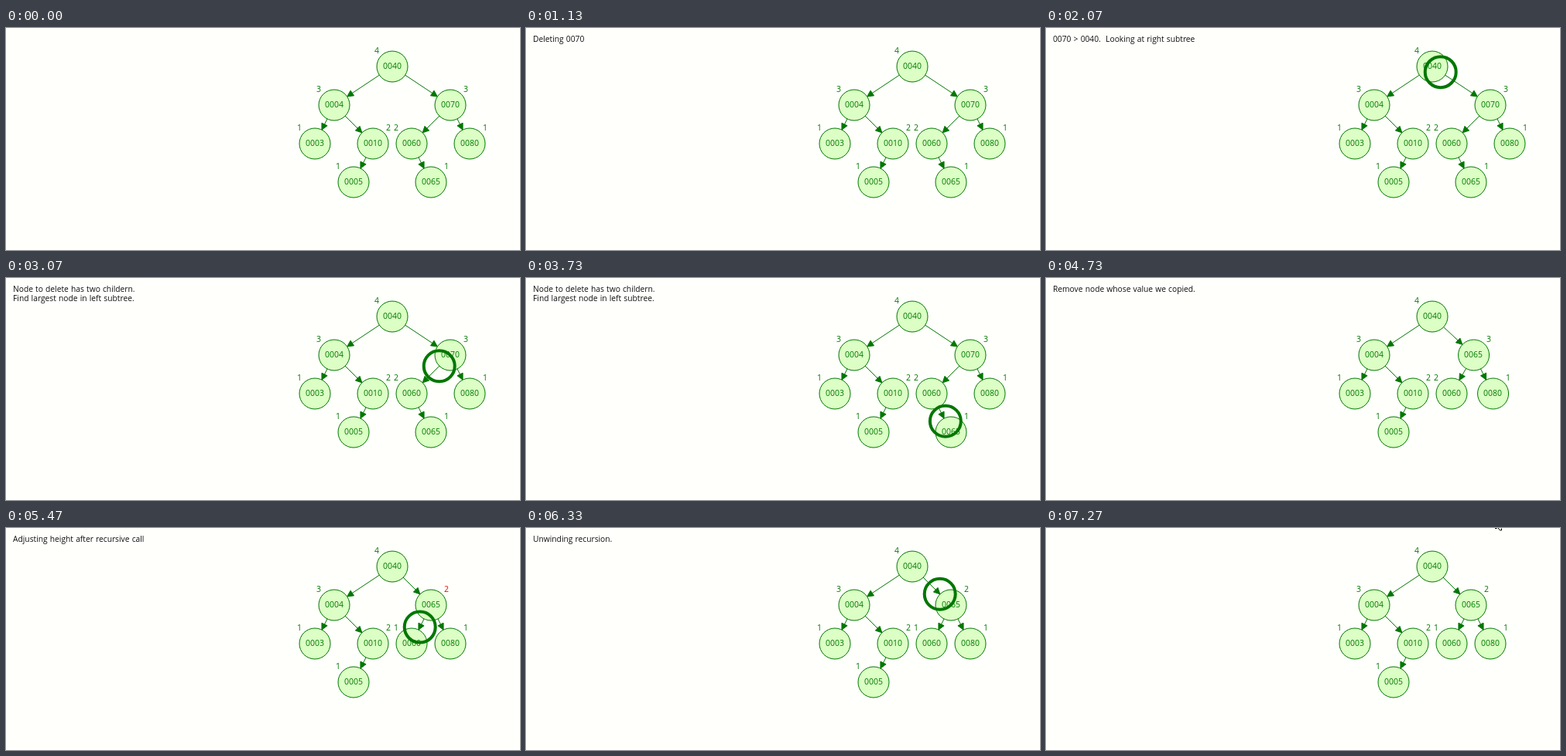
An HTML page with a canvas that plays this animation: 664 px wide and 288 px high, repeating every 7670 ms.

```html
<!DOCTYPE html>
<html lang="en">
<head>
<meta charset="utf-8">
<title>AVL tree deletion</title>
<style>
  html, body { margin: 0; width: 100%; height: 100%; overflow: hidden; background: #fffffc; }
  canvas { display: block; }
</style>
</head>
<body>
<canvas id="stage" width="664" height="288"></canvas>
<script>
const LOOP = 7670;
const BLOCK = 14; // ticks per step, 30 ticks per second
const GREEN = '#007700', RED = '#ff0000', FILL = '#dbffc4', PAPER = '#fffffc', INK = '#111';
const FAMILY = '"Open Sans", "Noto Sans", sans-serif';
const ctx = document.getElementById('stage').getContext('2d');

const captions = [
  [0, ''],
  [33, 'Deleting 0070'],
  [46, '0070 > 0040.  Looking at right subtree'],
  [74, '0070 == 0070.  Found node to delete'],
  [88, 'Node to delete has two childern.\nFind largest node in left subtree.'],
  [116, 'Copy largest value of left subtree into node to delete.'],
  [130, 'Remove node whose value we copied.'],
  [144, 'Adjusting height after recursive call'],
  [186, 'Unwinding recursion.'],
  [200, '']
];

// Highlight ring: start tick, from node, to node
const ringMoves = [
  [60, 'root', 'right'],
  [88, 'right', 'mid'],
  [102, 'mid', 'leaf'],
  [116, 'leaf', 'leaf'],
  [144, 'mid', 'mid'],
  [158, 'mid', 'right'],
  [186, 'right', 'root']
];

const pulses = [[46, 'root'], [74, 'right']];
const links = ['root left', 'root right', 'left n3', 'left n10', 'n10 n5',
               'right mid', 'right n80', 'mid leaf'];

const progress = (tick, start) => Math.min(1, Math.max(0, (tick - start) / BLOCK));
const active = (tick, start) => tick >= start && tick < start + BLOCK;
const mix = (a, b, p) => a + (b - a) * p;

// side is -1 or 1: where the height label sits
function node(x, y, text, height, side, labelColor = GREEN) {
  return { x, y, text, height, side, labelColor };
}

function buildTree(tick) {
  const shift = 25 * progress(tick, 130);
  const value = tick < 116 ? '0070' : tick < 130 ? '' : '0065';
  const tree = {
    root: node(499, 50, '0040', 4, -1),
    left: node(424, 100, '0004', 3, -1),
    n3: node(399, 150, '0003', 1, -1),
    n10: node(474, 150, '0010', 2, 1),
    n5: node(449, 200, '0005', 1, -1),
    right: node(574 - shift, 100, value, tick < 158 ? 3 : 2, 1,
                tick >= 158 && tick < 186 ? RED : GREEN),
    mid: node(524, 150, '0060', tick < 144 ? 2 : 1, -1, active(tick, 144) ? RED : GREEN),
    n80: node(599 - shift, 150, '0080', 1, 1)
  };
  if (tick < 130) tree.leaf = node(549, 200, '0065', 1, 1);
  return tree;
}

// Centred text, its left edge on a whole pixel
function write(text, x, y, color) {
  ctx.font = '10.45px ' + FAMILY;
  ctx.fillStyle = color;
  ctx.fillText(text, Math.floor(x - ctx.measureText(text).width / 2), Math.round(y));
}

function writeCaption(tick) {
  const caption = captions.filter(c => tick >= c[0]).pop()[1];
  ctx.save();
  ctx.font = '10.25px ' + FAMILY;
  ctx.wordSpacing = '0.5px';
  ctx.fillStyle = INK;
  caption.split('\n').forEach((line, i) => ctx.fillText(line, 9, 18 + 12 * i));
  ctx.restore();
}

function disc(x, y, r) {
  ctx.beginPath();
  ctx.arc(x, y, r, 0, Math.PI * 2);
}

function drawLink(a, b) {
  const d = Math.hypot(b.x - a.x, b.y - a.y);
  const ux = (b.x - a.x) / d, uy = (b.y - a.y) / d;
  const tipX = b.x - ux * 20, tipY = b.y - uy * 20;
  const baseX = tipX - ux * 8, baseY = tipY - uy * 8;
  ctx.strokeStyle = ctx.fillStyle = GREEN;
  ctx.lineWidth = 1;
  ctx.beginPath();
  ctx.moveTo(a.x, a.y);
  ctx.lineTo(tipX, tipY);
  ctx.stroke();
  ctx.beginPath();
  ctx.moveTo(tipX, tipY);
  ctx.lineTo(baseX - uy * 4, baseY + ux * 4);
  ctx.lineTo(baseX + uy * 4, baseY - ux * 4);
  ctx.closePath();
  ctx.fill();
  ctx.stroke();
}

function drawNode(n) {
  disc(n.x, n.y, 20);
  ctx.fillStyle = FILL;
  ctx.fill();
  ctx.strokeStyle = GREEN;
  ctx.lineWidth = 1;
  ctx.stroke();
  write(n.text, n.x, n.y + 3, GREEN);
  write(n.height, n.x + 20 * n.side, n.y - 17, n.labelColor);
}

function drawRing(tree, tick) {
  const move = ringMoves.find(m => active(tick, m[0]));
  if (!move) return;
  const [start, from, to] = move, p = progress(tick, start);
  disc(mix(tree[from].x, tree[to].x, p), mix(tree[from].y, tree[to].y, p), 20);
  ctx.strokeStyle = GREEN;
  ctx.lineWidth = 4;
  ctx.stroke();
}

// Lower tip of a mouse pointer peeking in at the top edge
function drawPointer(tick) {
  if (tick < 211) return;
  const x = 580 + Math.max(0, 214 - tick) * 1.7;
  ctx.strokeStyle = '#000';
  ctx.lineWidth = 1;
  ctx.beginPath();
  ctx.moveTo(x, 0.5);
  ctx.lineTo(x + 2.5, 0.5);
  ctx.moveTo(x + 4, 0);
  ctx.lineTo(x + 6.5, 3);
  ctx.lineTo(x + 8.5, 3);
  ctx.lineTo(x + 8.5, 0.5);
  ctx.stroke();
}

function draw(tick) {
  const tree = buildTree(tick);
  ctx.fillStyle = PAPER;
  ctx.fillRect(0, 0, 664, 288);

  for (const link of links) {
    const [a, b] = link.split(' ');
    if (tree[b]) drawLink(tree[a], tree[b]);
  }
  for (const [start, name] of pulses) {
    if (!active(tick, start)) continue;
    disc(tree[name].x, tree[name].y, 23 + Math.abs(tick / 7 % 8 - 4));
    ctx.fillStyle = RED;
    ctx.fill();
  }
  Object.values(tree).forEach(drawNode);
  drawRing(tree, tick);

  if (active(tick, 116)) {
    const p = progress(tick, 116);
    write('0065', mix(549, 574, p), mix(200, 100, p) + 3, INK);
  }
  writeCaption(tick);
  drawPointer(tick);
}

const begin = performance.now();
function loop() {
  const t = (performance.now() - begin) % LOOP;
  draw(Math.floor((t + 4) * 0.03));
  requestAnimationFrame(loop);
}
loop();
</script>
</body>
</html>
```
